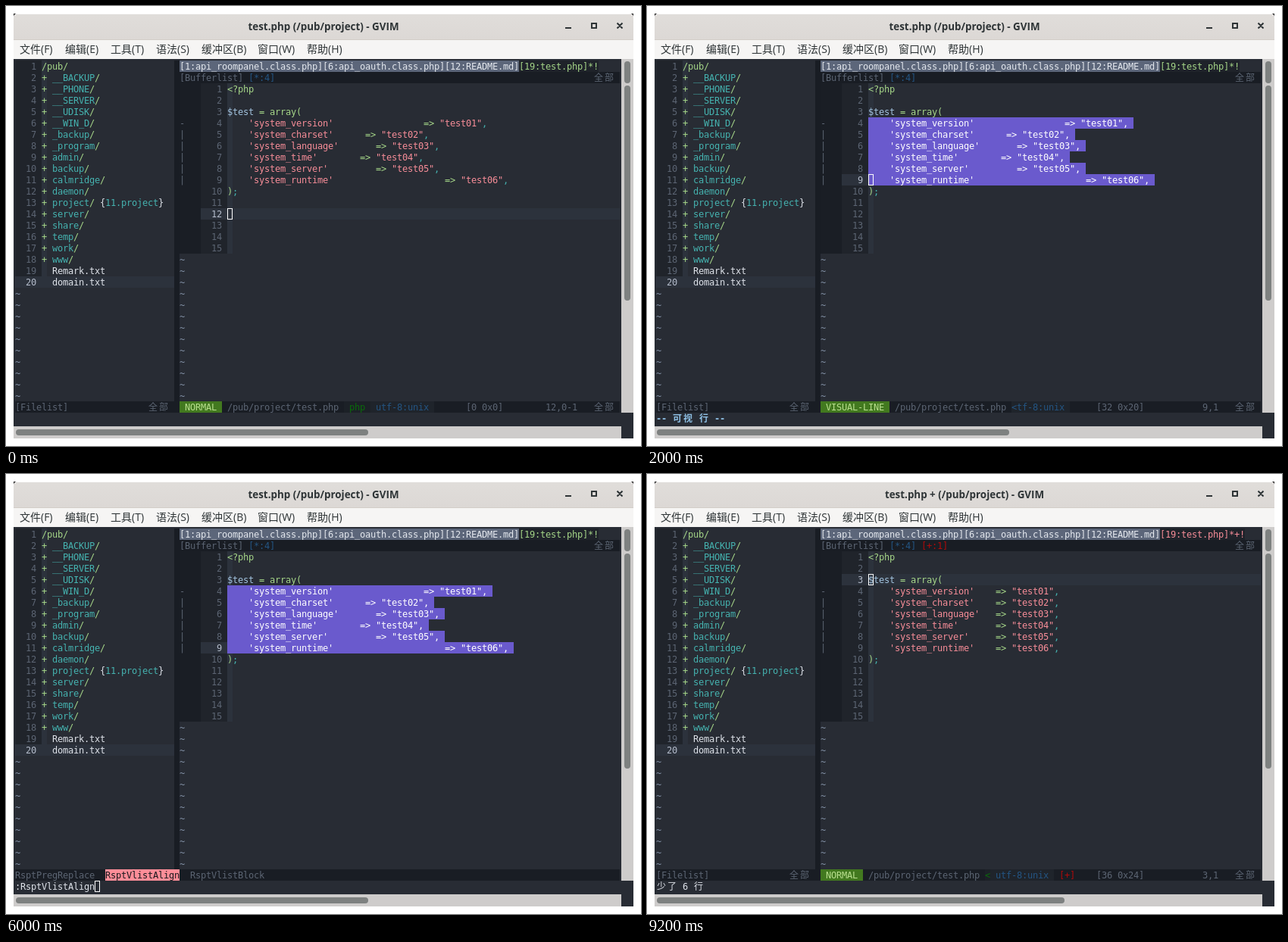
Recreate the animation shown at these times as an HTML page. Size 838x581 px, loop 10 s.

```html
<!DOCTYPE html>
<html lang="zh-CN">
<head>
<meta charset="utf-8">
<title>Align list</title>
<style>
  html, body { margin: 0; width: 100%; height: 100%; overflow: hidden; background: #fff; }
  #stage { position: relative; width: 838px; height: 581px; overflow: hidden; }
  #stage div, .run, svg { position: absolute; }

  .corner { background: #222; }
  .bar { background: linear-gradient(#e0ddda, #dcd8d5); border-radius: 5px 5px 0 0; box-shadow: inset 0 1px #f9f8f8, inset 0 -1px #d2cdc8; }
  .menu { background: #f6f5f4; }
  .menu span { position: absolute; top: 0; }
  .menu, .title { color: #2e3436; font: 14px/24px "Open Sans", "Noto Sans CJK SC", "Noto Sans CJK", sans-serif; white-space: pre; }
  .title { font-size: 13.4px; font-weight: 700; line-height: 34px; text-align: center; }
  .track { background: #cecccb; }
  .thumb { background: #7e8180; border-radius: 4px; }

  /* The tall line height puts the baseline 12px below the cell top. */
  .run { height: 15px; font: 12px/17px "DejaVu Sans Mono", "Noto Sans CJK SC", "Noto Sans CJK", monospace; white-space: pre; letter-spacing: var(--fit, 0); }
  .run span { display: inline-block; height: 15px; vertical-align: top; }
  .run .cjk { position: relative; left: 1px; letter-spacing: 2px; }
  .bold { font-weight: 700; }

  .bg { background: #282c34; }
  .dark { background: #191d24; }
  .gutter { background: #20242b; }
  .fold { background: #1a1e25; }
  .line { background: #2c323c; }
  .tabbg { background: #1f232a; }

  .txt { color: #dfe3ea; }
  .grn { color: #a5d688; }
  .dir { color: #45b3b0; }
  .str { color: #f78d98; }
  .var { color: #a3c4e0; }
  .num { color: #5c6573; }
  .now { color: #b4bccb; }
  .til { color: #8493a8; }
  .msg { color: #8fc1e6; }
  .tab { color: #e4e8ee; background: #5c667a; }
  .sel { color: #fff; background: #6a5acd; }
  .mode { color: #b9e08e; background: #42791f; }
  .type { color: #0a6b0a; background: #1c2127; }
  .enc { color: #245583; background: #1f242b; }
  .blue { color: #245583; }
  .red { color: #b00b0b; }
  .pick { color: #14171c; background: #ff8d98; }
  .caret { width: 5px; height: 13px; border: 1px solid #fff; }

  .scene { inset: 0; visibility: hidden; animation: show 10s step-end infinite; }
  @keyframes show { 0% { visibility: visible; } 20%, 100% { visibility: hidden; } }
</style>
</head>
<body>
<div id="stage"></div>
<script>
const X0 = 12, Y0 = 72, CW = 7, CH = 15;
const RIGHT = 31, CODE = 40, STATUS = 30, CMD = 31;
const stage = document.getElementById('stage');

function box(el, cls, x, y, w, h) {
  const d = document.createElement('div');
  d.className = cls;
  d.style.cssText = `left:${x}px;top:${y}px;width:${w}px;height:${h}px`;
  return el.appendChild(d);
}

// A box measured in character cells.
const cells = (el, cls, row, col, w, h = 1) =>
  box(el, cls, X0 + col * CW, Y0 + row * CH, w * CW, h * CH);

// Coloured text runs, each part being [class, text].
function put(el, row, col, ...parts) {
  const run = document.createElement('div');
  run.className = 'run';
  run.style.left = X0 + col * CW + 'px';
  run.style.top = Y0 + row * CH + 'px';
  for (const [cls, text] of parts) {
    for (const piece of text.split(/([\u4e00-\u9fff]+)/).filter(Boolean)) {
      const s = document.createElement('span');
      s.className = cls + (piece > '\u4e00' ? ' cjk' : '');
      s.textContent = piece;
      run.append(s);
    }
  }
  el.append(run);
}

function caret(el, row, col) {
  const c = cells(el, 'caret', row, col, 1);
  c.style.width = c.style.height = '';
}

// Letter spacing that brings the font onto the 7px grid.
function fitFont() {
  put(stage, 0, 0, ['txt', '0'.repeat(100)]);
  const probe = stage.lastChild;
  const width = probe.getBoundingClientRect().width / 100;
  probe.remove();
  stage.style.setProperty('--fit', CW - width + 'px');
}

function drawWindow() {
  box(stage, 'corner', 10, 10, 818, 4);
  box(stage, 'bar', 10, 10, 818, 35);
  const icons = document.createElementNS('http://www.w3.org/2000/svg', 'svg');
  icons.setAttribute('width', 838);
  icons.setAttribute('height', 45);
  icons.innerHTML = '<path d="M738 29H746M773 23H779V29H773ZM806.5 22.5L813.5 29.5M813.5 22.5L806.5 29.5" fill="none" stroke="#2e3436" stroke-width="2"/>';
  stage.append(icons);

  const menu = box(stage, 'menu', 10, 45, 818, 25);
  const items = { 18: '文件(F)', 78: '编辑(E)', 138: '工具(T)', 198: '语法(S)', 258: '缓冲区(B)', 332: '窗口(W)', 397: '帮助(H)' };
  for (const x in items) {
    const s = document.createElement('span');
    s.style.left = x - 10 + 'px';
    s.textContent = items[x];
    menu.append(s);
  }

  box(stage, 'bg', 10, 70, 818, 501);
  box(stage, 'track', 812, 70, 16, 467);
  box(stage, 'thumb', 816, 73, 8, 29);
  box(stage, 'thumb', 816, 105, 8, 284);
  box(stage, 'track', 10, 555, 802, 16);
}

function drawFiles() {
  cells(stage, 'gutter', 0, 0, 5, 20);
  cells(stage, 'line', 0, 5, 1, 20);
  cells(stage, 'line', 19, 0, 30);
  cells(stage, 'dark', 0, 30, 1, 31);
  const dirs = '__BACKUP __PHONE __SERVER __UDISK __WIN_D _backup _program admin backup calmridge daemon project server share temp work www'.split(' ');
  for (let n = 1; n <= 20; n++) put(stage, n - 1, 0, [n == 20 ? 'now' : 'num', String(n).padStart(4)]);
  put(stage, 0, 5, ['grn', '/pub/']);
  dirs.forEach((name, i) => {
    const parts = [['grn', '+ '], ['dir', name], ['grn', '/']];
    if (name == 'project') parts.push(['txt', ' {'], ['dir', '11.project'], ['txt', '}']);
    put(stage, i + 1, 5, ...parts);
  });
  put(stage, 18, 7, ['txt', 'Remark.txt']);
  put(stage, 19, 7, ['txt', 'domain.txt']);
  for (let r = 20; r < STATUS; r++) put(stage, r, 0, ['til', '~']);
}

function drawEditor() {
  put(stage, 0, RIGHT, ['tab', '[1:api_roompanel.class.php][6:api_oauth.class.php][12:README.md]']);
  cells(stage, 'dark', 1, RIGHT, 83);
  put(stage, 1, RIGHT, ['num', '[Bufferlist] '], ['blue', '[*:4]']);
  put(stage, 1, 109, ['num', '全部']);
  cells(stage, 'fold', 2, RIGHT, 4, 15);
  cells(stage, 'gutter', 2, RIGHT + 4, 5, 15);
  cells(stage, 'line', 2, CODE, 1, 15);
  for (let n = 4; n <= 9; n++) put(stage, n + 1, RIGHT, ['num', n == 4 ? '-' : '|']);
  for (let r = 17; r < STATUS; r++) put(stage, r, RIGHT, ['til', '~']);
  cells(stage, 'dark', STATUS, 0, 114);
}

const keys = ['version', 'charset', 'language', 'time', 'server', 'runtime'];
const ragged = [37, 26, 28, 25, 28, 41];

function drawCode(el, { line, arrows = ragged, visual }) {
  cells(el, 'line', line + 1, RIGHT + 4, visual ? 5 : 79);
  for (let n = 1; n <= 15; n++) put(el, n + 1, RIGHT + 4, [n == line ? 'now' : 'num', String(n).padStart(4)]);
  put(el, 2, CODE, ['grn', '<?php']);
  put(el, 4, CODE, ['var', '$test '], ['grn', '= array(']);
  keys.forEach((key, i) => {
    const name = `    'system_${key}'`.padEnd(arrows[i]);
    const value = `"test0${i + 1}"`;
    if (visual) put(el, i + 5, CODE, ['sel', `${name}=> ${value}, `]);
    else put(el, i + 5, CODE, ['str', name], ['grn', '=> '], ['str', value], ['dir', ',']);
  });
  put(el, 11, CODE, ['grn', ')'], ['dir', ';']);
}

function drawStatus(el, { mode, info, char, pos }) {
  put(el, STATUS, 0, ['num', '[Filelist]']);
  put(el, STATUS, 25, ['num', '全部']);
  put(el, STATUS, RIGHT, ['mode', ` ${mode} `], ['num', ' /pub/project/test.php '], ...info);
  put(el, STATUS, char[0], ['num', char[1]]);
  put(el, STATUS, pos[0], ['num', pos[1]]);
  put(el, STATUS, 109, ['num', '全部']);
}

const enc = ['enc', ' utf-8:unix '];
const scenes = [
  { line: 12, caret: [13, CODE], cmd: [],
    mode: 'NORMAL', info: [['type', ' php '], enc], char: [85, '[0 0x0]'], pos: [100, '12,0-1'] },
  { line: 9, visual: true, caret: [10, CODE], cmd: [['msg bold', '-- 可视 行 --']],
    mode: 'VISUAL-LINE', info: [['enc', '<tf-8:unix ']], char: [83, '[32 0x20]'], pos: [103, '9,1'] },
  { line: 9, visual: true, caret: [CMD, 5], cmd: [['txt', ':Rspt']],
    mode: 'COMMAND', info: [['type', '<p '], enc], char: [83, '[32 0x20]'], pos: [103, '4,1'] },
  { line: 9, visual: true, caret: [CMD, 15], cmd: [['txt', ':RsptVlistAlign']],
    wild: [['num', 'RsptPregReplace  '], ['pick', 'RsptVlistAlign'], ['num', '  RsptVlistBlock']] },
  { line: 3, arrows: Array(6).fill(24), caret: [4, CODE], cmd: [['txt', '少了 6 行']], changed: true,
    mode: 'NORMAL', info: [['type', '<'], enc, ['red', ' [+] ']], char: [83, '[36 0x24]'], pos: [103, '3,1'] },
];

function drawScene(scene, i) {
  const el = document.createElement('div');
  el.className = 'scene';
  el.style.animationDelay = 2 * i - 10 + 's';
  stage.append(el);
  const { changed, wild } = scene;
  box(el, 'title', 10, 10, 818, 34).textContent = `test.php ${changed ? '+ ' : ''}(/pub/project) - GVIM`;
  put(el, 0, 95, changed ? ['str tabbg', '[19:test.php]*+!'] : ['grn tabbg', '[19:test.php]*!']);
  if (changed) put(el, 1, 50, ['red', '[+:1]']);
  drawCode(el, scene);
  if (wild) put(el, STATUS, 0, ...wild);
  else drawStatus(el, scene);
  put(el, CMD, 0, ...scene.cmd);
  caret(el, ...scene.caret);
  box(el, 'thumb', 13, 559, changed ? 538 : 465, 8);
}

fitFont();
drawWindow();
drawFiles();
drawEditor();
scenes.forEach(drawScene);
</script>
</body>
</html>
```
